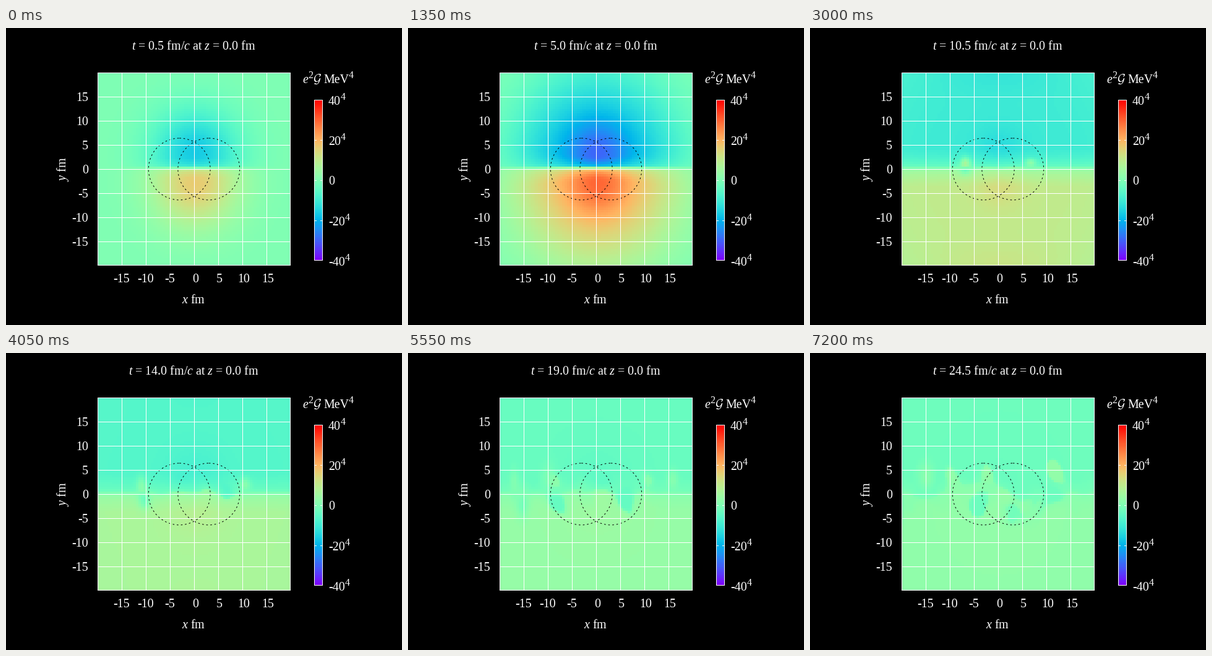
A matplotlib script for the animation above (7.35 s loop, 640 by 480 pixels).

```python
import numpy as np
import matplotlib.pyplot as plt
from matplotlib.animation import FuncAnimation
from matplotlib.patches import Circle, Rectangle

W, H, DPI = 640, 480, 100
FRAMES, STEP_MS = 49, 150
PX = 72 / DPI                      # one pixel in points
LEFT, TOP, SIDE = 148, 72, 312     # plot square
CX, CY, FM = 304, 228, 7.8         # plot centre, pixels per fm
LIMIT = 40

plt.rcParams.update({
    "font.family": "Liberation Serif",
    "mathtext.fontset": "custom",
    "mathtext.rm": "Liberation Serif",
    "mathtext.it": "Liberation Serif:italic",
})

fig = plt.figure(figsize=(W / DPI, H / DPI), dpi=DPI, facecolor="black")
ax = fig.add_axes([0, 0, 1, 1])

# --- field ---------------------------------------------------------------
grid = np.arange(-20, 20, 0.5)
X, Y = np.meshgrid(grid, grid)
R = np.hypot(X, 0.87 * Y)
D = np.hypot(X, np.abs(Y) - 3.5)

rng = np.random.default_rng(12)
WAVES = [(rng.uniform(0.25, 1) * rng.choice([-1, 1]), rng.uniform(-0.9, 0.9),
          rng.uniform(-0.4, 0.4), rng.uniform(0, 2 * np.pi)) for _ in range(9)]

T_KEYS = [0.5, 1, 2.5, 5, 7.5, 9, 10.5, 13, 17, 21, 24.5]
KEYS = dict(
    broad=[4, 10, 18, 18.5, 18, 15, 10.3, 7.5, 4.2, 3.2, 2.8],
    core=[12.5, 15, 12, 11, 8.5, 6, 3.2, 2.2, 1.5, 0.8, 0.4],
    width=[8.5, 8.5, 9, 6.5, 5, 4.5, 5, 6, 7, 7, 8],
    reach=[12, 12.5, 13.5, 18.5, 22.5, 28, 38, 50, 60, 60, 60],
    power=[2.5, 2.3, 2.2, 3, 4, 4, 4, 4, 4, 4, 4],
)


def ramp(t, a, b):
    return np.clip((t - a) / (b - a), 0, 1)


def bump(x, y, rx, ry):
    return np.exp(-((X - x) / rx) ** 2 - ((Y - y) / ry) ** 2)


def turbulence(t):
    """Vertical shift of the sign boundary, growing late in the collision."""
    if t <= 9:
        return 0
    n = sum(np.sin(kx * X + ky * Y + w * t + p) for kx, ky, w, p in WAVES)
    n *= np.sqrt(2 / len(WAVES))
    amp = np.interp(t, [9, 10.5, 17, 21, 24.5], [0, 0.15, 1.2, 2.4, 4])
    span = max(t - 6, 1)
    height = 0.45 * (t - 8)
    env = np.exp(-(X / span) ** 6 - (Y / height) ** 2)
    late = ramp(t, 19, 24.5)
    tilt = late * (5.5 * bump(4, -4, 4, 6) - 2.5 * bump(-4, 1, 4, 5))
    return amp * env * n * np.abs(n) + tilt


def flips(t):
    """Sign-reversing patches that run outwards along the boundary."""
    on = ramp(t, 8, 10.5)
    grow = max(t - 10.5, 0)
    ry = 1.3 + 0.2 * grow
    out = t - 3.5
    f = 1 - 1.5 * on * bump(-out, -0.35 * min(grow, 6.5), 1.2, ry)
    f -= 1.4 * on * bump(out - 0.5 + 0.07 * grow, 0.9 + 0.2 * grow, 1.1, 0.9 + 0.15 * grow)
    f -= 1.2 * on * bump(-out - 0.2 * grow, 1 + 0.1 * grow, 0.9, ry)
    f -= 1.7 * ramp(t, 17, 21) * bump(6.9 - 0.9 * t, 3.5, 1.5, 2.8)
    return f


def sign_profile(t):
    """Steep odd step across y = 0, softer at the sides and at late times."""
    late = ramp(t, 8, 10.5)
    drift = 0.004 * ramp(t, 0.5, 2.5) * np.exp(-(X / 7) ** 4)
    y = Y + turbulence(t) - drift
    soft = 2 + 2 * late + 0.25 * np.abs(X) * ramp(t, 2.5, 7.5) * (1 - late)
    power = 0.2 + 0.05 * ramp(t, 2.5, 7.5) + 0.15 * late
    return np.sign(y) * np.minimum(1, np.abs(y) / soft) ** power


def field(t):
    k = {name: np.interp(t, T_KEYS, v) for name, v in KEYS.items()}
    edge = 1.5 * ramp(t, 8, 10.5) * (1 - ramp(t, 10.5, 15))
    size = (k["broad"] * np.exp(-(R / k["reach"]) ** k["power"])
            + k["core"] * np.exp(-(D / k["width"]) ** 2)
            + edge * (bump(0, 20, 12, 4) + bump(0, -20, 12, 4)))
    return -size * sign_profile(t) * flips(t)


style = dict(cmap="rainbow", vmin=-LIMIT, vmax=LIMIT, origin="lower",
             interpolation="nearest", aspect="auto")
heat = ax.imshow(field(0.5), extent=(LEFT, LEFT + SIDE, TOP + SIDE, TOP), **style)


# --- fixed drawing -------------------------------------------------------
def text(x, y, s, size=20, **kw):
    kw = {"ha": "left", "va": "baseline", "color": "white", **kw}
    return ax.text(x, y, s, fontsize=size * PX, **kw)


def superscript(base, y, s):
    ax.annotate(s, xy=(1, y - 8), xycoords=(base, "data"), color="white",
                fontsize=16 * PX, ha="left", va="baseline", annotation_clip=False)


def line(xs, ys):
    ax.plot(xs, ys, color="white", lw=PX, solid_capstyle="butt", snap=False)


def box(x, y, w, h):
    ax.add_patch(Rectangle((x + 0.5, y + 0.5), w - 1, h - 1, fill=False,
                           ec="white", lw=PX, snap=False))


for v in range(-15, 20, 5):
    gx, gy = CX + v * FM, CY - v * FM
    line([gx + 0.5] * 2, [TOP, TOP + SIDE])
    line([LEFT, LEFT + SIDE], [gy + 0.5] * 2)
    text(gx + (2 if v >= 0 else 0), 411, str(v), ha="center")
    text(133, gy + 7, str(v), ha="right")
box(LEFT, TOP, SIDE, SIDE)

for x in (-3.05, 3.05):
    ax.add_patch(Circle((CX + x * FM, CY), 6.4 * FM, fill=False, ec="black",
                        lw=PX, ls=(0, (2.6, 4))))

text(303, 445, "$x$ fm", ha="center")
text(97, 228, "$y$ fm", ha="center", rotation=90, rotation_mode="anchor")

# colour scale
BAR_X, BAR_Y, BAR_W, BAR_H = 498, 116, 14, 260
ax.imshow(np.linspace(-LIMIT, LIMIT, 256)[:, None],
          extent=(BAR_X, BAR_X + BAR_W, BAR_Y + BAR_H, BAR_Y), **style)
box(BAR_X, BAR_Y, BAR_W, BAR_H)
for v in range(-LIMIT, LIMIT + 1, 20):
    y = BAR_Y + BAR_H * (LIMIT - v) // (2 * LIMIT)
    if abs(v) < LIMIT:
        line([BAR_X, BAR_X + 4], [y + 0.5] * 2)
        line([BAR_X + BAR_W - 4, BAR_X + BAR_W], [y + 0.5] * 2)
    if v:
        superscript(text(521, y + 8, str(v)), y + 8, "4")
    else:
        text(521, y + 7, "0")

superscript(text(479, 89, "e", style="italic"), 89, "2")
text(496, 89, r"$\mathcal{G}$", math_fontfamily="cm")
superscript(text(513, 89, "MeV"), 89, "4")

title = text(303, 35, "", ha="center")

ax.set_xlim(0, W)
ax.set_ylim(H, 0)
ax.axis("off")


def update(i):
    t = 0.5 * (i + 1)
    heat.set_data(field(t))
    title.set_text(f"$t$ = {t:.1f} fm/$c$ at $z$ = 0.0 fm")
    return heat, title


anim = FuncAnimation(fig, update, frames=FRAMES, interval=STEP_MS,
                     repeat=True, repeat_delay=0, blit=False)
plt.show()
```
